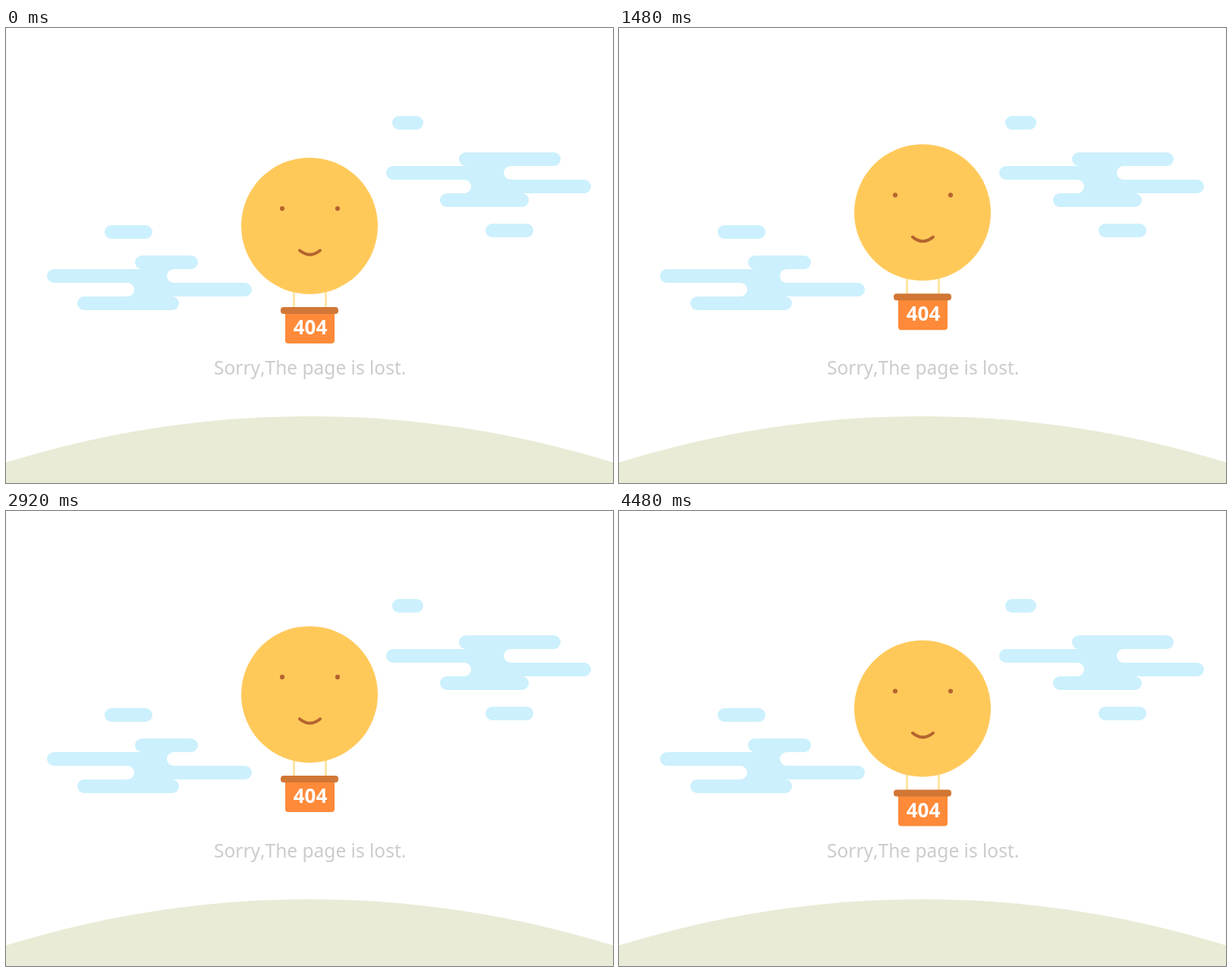
An HTML page for the animation above (4.52 s loop, 800x600 px).

```html
<!DOCTYPE html>
<html lang="en">
<head>
<meta charset="utf-8">
<title>404</title>
<style>
html, body { margin: 0; height: 100%; overflow: hidden; background: #fff; }
svg { display: block; width: 800px; height: 600px; }
text { font-family: "Noto Sans", "Open Sans", sans-serif; font-kerning: none; }
</style>
</head>
<body>
<svg viewBox="0 0 800 600">
  <circle cx="400" cy="1854" r="1342" fill="#e9ebd6"/>
  <g id="clouds" fill="#ccf0fd"></g>
  <text x="274" y="456.5" font-size="24.5" fill="#ccc">Sorry,The page is lost.</text>
  <g id="balloon">
    <path d="M379.5 345V370M421.5 345V370" stroke="#ffe4a3" stroke-width="3"/>
    <circle cx="400" cy="261" r="90" fill="#ffc95a"/>
    <g fill="#b5652f">
      <circle cx="364" cy="238" r="3.1"/>
      <circle cx="437" cy="238" r="3.1"/>
    </g>
    <path d="M387 293.3Q400.5 304.5 414 293.3" fill="none" stroke="#b5652f" stroke-width="4" stroke-linecap="round"/>
    <rect x="368" y="370" width="65" height="46" rx="4" fill="#ff8a39"/>
    <rect x="362" y="368" width="76" height="9" rx="4" fill="#d17736"/>
    <text x="401" y="404" font-size="26" font-weight="700" text-anchor="middle" fill="#fff">404</text>
  </g>
</svg>
<script>
const LOOP = 4520, STEP = 40, RISE = 27, ROW = 18, R = ROW / 2;
const balloon = document.getElementById("balloon");

const pill = (x1, x2, y) =>
  `<rect x="${x1}" y="${y}" width="${x2 - x1}" height="${ROW}" rx="${R}"/>`;

// Four stacked bars; the middle two end in a concave notch at n1 and n2.
function cloud(y, [a1, a2], [b, n1], [n2, c], [d1, d2]) {
  const bar = (x, notch, top, sweep) => {
    const end = notch + (sweep ? -R : R), tip = x + (sweep ? -R : R);
    return `<path d="M${tip} ${top}H${end}a${R} ${R} 0 0 ${sweep} 0 ${ROW}H${tip}a${R} ${R} 0 0 ${sweep ? 0 : 1} 0 ${-ROW}z"/>`;
  };
  return pill(a1, a2, y) + bar(b, n1, y + ROW, 0) +
    bar(c, n2, y + 2 * ROW, 1) + pill(d1, d2, y + 3 * ROW);
}

document.getElementById("clouds").innerHTML =
  pill(509, 550, 116) + pill(632, 695, 258) + pill(130, 193, 260) +
  cloud(164, [597, 731], [501, 656], [613, 771], [572, 689]) +
  cloud(300, [170, 253], [54, 212], [169, 324], [94, 228]);

const start = performance.now();
function draw() {
  const elapsed = (performance.now() - start) % LOOP;
  const t = Math.floor(elapsed / STEP) * STEP;
  const lift = RISE * (1 - Math.abs(2 * t / LOOP - 1));
  balloon.setAttribute("transform", `translate(0 ${-lift})`);
  requestAnimationFrame(draw);
}
draw();
</script>
</body>
</html>
```
